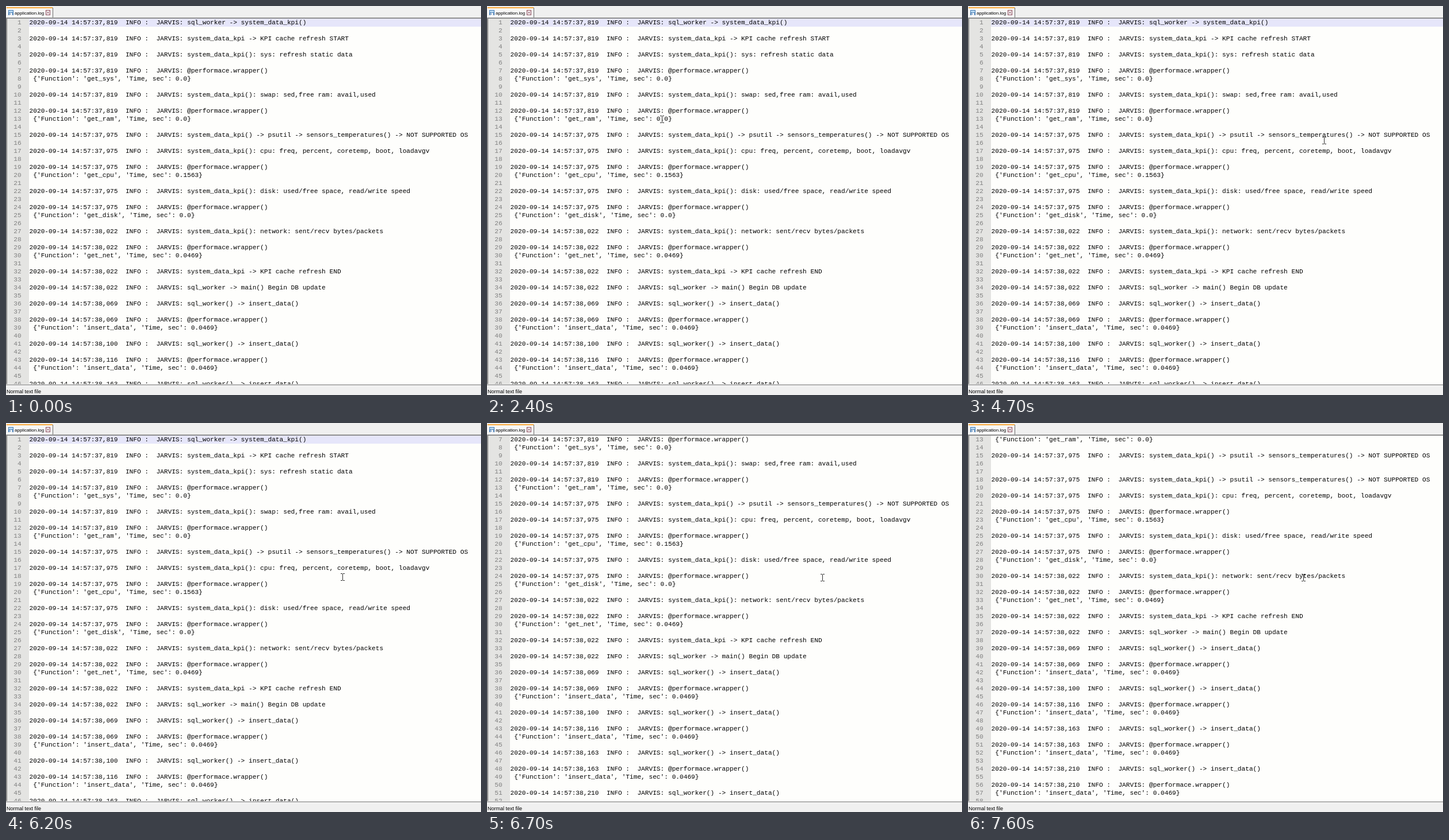
Write an HTML page with a canvas that moves like this. It is 826 by 678 pixels and loops after 8000 ms.

```html
<!DOCTYPE html>
<html lang="en">
<head>
<meta charset="utf-8">
<title>application.log</title>
<style>
  html, body { margin: 0; width: 100%; height: 100%; overflow: hidden; background: #f0f0f0; }
  canvas { display: block; }
</style>
</head>
<body>
<canvas id="stage" width="826" height="678"></canvas>
<script>
const ctx = document.getElementById('stage').getContext('2d');
const W = 826, H = 678, LOOP = 8000, TICK = 100;
const TOP = 22, ROW = 14, ROWS = 46, BOTTOM = 659;
const MONO = '"Liberation Mono", "Courier New", monospace';
const SANS = '"Liberation Sans", Arial, sans-serif';
const SIZE = 11.15, PITCH = SIZE * 0.6;

// Log contents, built the way the logger writes them
const lines = [];
const info = (time, msg) =>
  lines.push('2020-09-14 14:57:' + time + '  INFO :  JARVIS: ' + msg, '');
const timing = (time, name, sec) => {
  info(time, '@performace.wrapper()');
  lines.pop();
  lines.push(` {'Function': '${name}', 'Time, sec': ${sec}}`, '');
};
const kpi = 'system_data_kpi';
info('37,819', 'sql_worker -> ' + kpi + '()');
info('37,819', kpi + ' -> KPI cache refresh START');
info('37,819', kpi + '(): sys: refresh static data');
timing('37,819', 'get_sys', '0.0');
info('37,819', kpi + '(): swap: sed,free ram: avail,used');
timing('37,819', 'get_ram', '0.0');
info('37,975', kpi + '() -> psutil -> sensors_temperatures() -> NOT SUPPORTED OS');
info('37,975', kpi + '(): cpu: freq, percent, coretemp, boot, loadavgv');
timing('37,975', 'get_cpu', '0.1563');
info('37,975', kpi + '(): disk: used/free space, read/write speed');
timing('37,975', 'get_disk', '0.0');
info('38,022', kpi + '(): network: sent/recv bytes/packets');
timing('38,022', 'get_net', '0.0469');
info('38,022', kpi + ' -> KPI cache refresh END');
info('38,022', 'sql_worker -> main() Begin DB update');
for (const [start, end] of [['069', '069'], ['100', '116'], ['163', '163'], ['210', '210']]) {
  info('38,' + start, 'sql_worker() -> insert_data()');
  timing('38,' + end, 'insert_data', '0.0469');
}

// Places where the mouse slows down; it eases from one to the next
const stops = [
  { t: 1200, x: 156, y: 27 },
  { t: 1700, x: 172, y: 44 },
  { t: 2400, x: 304, y: 197 },
  { t: 3100, x: 345, y: 231 },
  { t: 4700, x: 619, y: 234 },
  { t: 5600, x: 716, y: 220 },
  { t: 6200, x: 585, y: 268 },
  { t: 6400, x: 583, y: 269 }
];
const scrolls = [6400, 6700, 7200, 7600];

const ease = k => k * k * (3 - 2 * k);
const caretOn = t => (t + 560) % 1060 < 400;

function mouseAt(t) {
  const i = stops.filter(s => s.t <= t).length;
  if (!i) return null;
  const a = stops[i - 1], b = stops[i];
  if (!b) return a;
  const k = ease((t - a.t) / (b.t - a.t));
  return { x: Math.round(a.x + (b.x - a.x) * k), y: Math.round(a.y + (b.y - a.y) * k) };
}

function rect(color, x, y, w, h) {
  ctx.fillStyle = color;
  ctx.fillRect(x, y, w, h);
}

// Large font under a uniform scale keeps fractional advances
function text(str, x, y, size, family, color) {
  const k = size / 20;
  ctx.save();
  ctx.translate(x, y);
  ctx.scale(k, k);
  ctx.font = '20px ' + family;
  ctx.fillStyle = color;
  ctx.fillText(str, 0, 0);
  ctx.restore();
}

function drawTab() {
  rect('#f0f0f0', 0, 0, W, H);
  rect('#f7f7f7', 1, 2, 80, 18);
  rect('#faaa3c', 1, 2, 80, 2);
  rect('#696969', 81, 3, 1, 17);
  // floppy icon
  rect('#4a7fb5', 4, 7, 9, 9);
  rect('#b9d9f2', 5, 8, 7, 3);
  rect('#e8eef4', 6, 12, 5, 4);
  rect('#4a7fb5', 7, 13, 1, 2);
  text('application.log', 15, 15, 8, SANS, '#000');
  // close button
  ctx.strokeStyle = '#8c4a5c';
  ctx.lineWidth = 1;
  ctx.strokeRect(69.5, 7.5, 7, 8);
  ctx.beginPath();
  ctx.moveTo(71, 9.5); ctx.lineTo(75, 13.5);
  ctx.moveTo(75, 9.5); ctx.lineTo(71, 13.5);
  ctx.stroke();
}

function drawRows(step) {
  const first = 3 * step;
  for (let r = 0; r < ROWS; r++) {
    const y = TOP + r * ROW + 10;
    const num = String(first + r + 1);
    text(num, 26.6 - num.length * PITCH, y, SIZE, MONO, '#808080');
    // the last scroll repaints only the upper rows of text
    const stale = step === scrolls.length && r > 3 ? 3 : 0;
    const line = lines[first + r - stale];
    if (line) text(line, 40.6, y, SIZE, MONO, '#000');
  }
}

function drawMouse({ x, y }) {
  const color = '#303030';
  rect(color, x, y - 5, 1, 11);
  for (const dy of [-6, 6])
    for (const dx of [-3, 1]) rect(color, x + dx, y + dy, 3, 1);
}

function draw(t) {
  const step = scrolls.filter(s => s <= t).length;
  drawTab();
  ctx.save();
  ctx.beginPath();
  ctx.rect(0, 20, W, BOTTOM - 20);
  ctx.clip();
  rect('#fefefc', 0, 20, W, BOTTOM - 20);
  rect('#e4e4e2', 2, TOP, 38, BOTTOM - TOP);
  if (!step) {
    rect('#e6e6fa', 40, TOP, W - 40, ROW);
    if (caretOn(t)) rect('#8000ff', 40, TOP, 1, ROW);
  }
  drawRows(step);
  rect('#a0a0a0', 0, 20, W, 1);
  rect('#808080', 0, 21, W, 1);
  rect('#a0a0a0', 0, 20, 1, BOTTOM);
  rect('#707070', 1, 21, 1, BOTTOM);
  const mouse = mouseAt(t);
  if (mouse) drawMouse(mouse);
  ctx.restore();
  rect('#e3e3e3', 0, 659, W, 1);
  rect('#808080', 0, 660, W, 1);
  rect('#fafafa', 0, 661, W, 1);
  text('Normal text file', 1, 674.5, 9, SANS, '#000');
}

const began = performance.now();
function tick() {
  const t = (performance.now() - began) % LOOP;
  draw(Math.floor(t / TICK) * TICK);
  requestAnimationFrame(tick);
}
tick();
</script>
</body>
</html>
```
